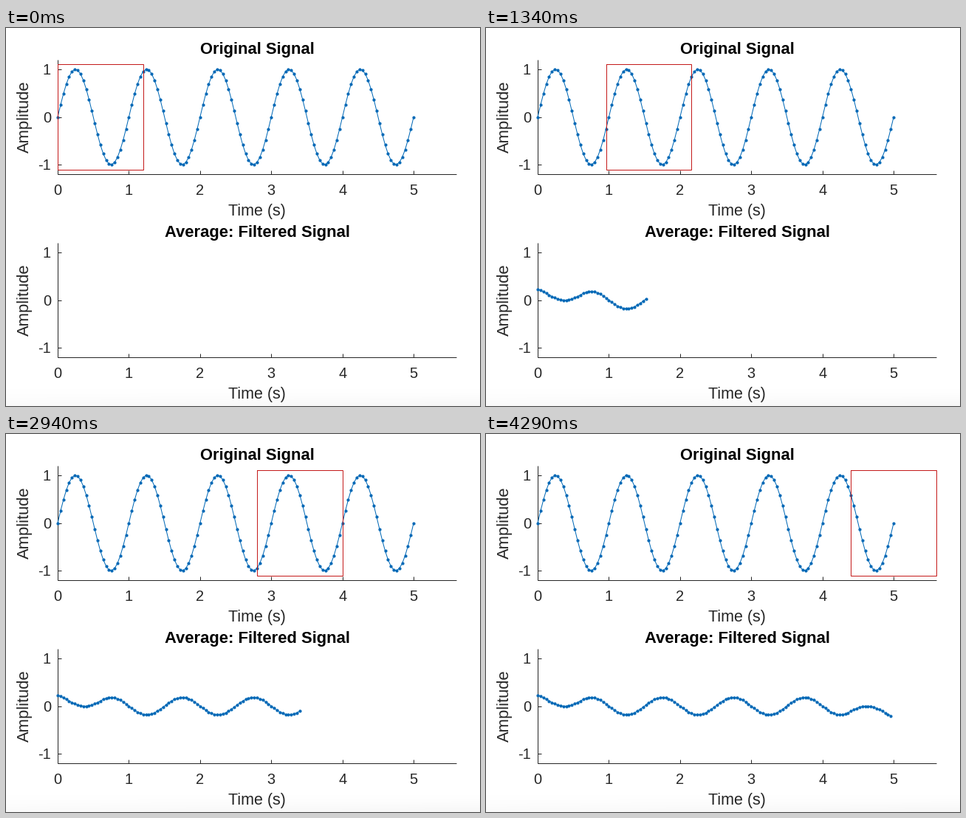
Write a matplotlib script that moves like this. It is 642 px wide and 512 px high and loops after 4.34 s.

```python
import numpy as np
import matplotlib.pyplot as plt
from matplotlib.animation import FuncAnimation
from matplotlib.collections import LineCollection

plt.rcParams["font.family"] = "Liberation Sans"

W, H, DPI = 642, 512, 64
PX = 72 / DPI                       # points per pixel
LOOP, TICK = 4340, 10               # ms
LEFT, RIGHT, HEIGHT = 70, 610, 155  # plot area in pixels
X_UNIT, Y_UNIT = 540 / 5.6, HEIGHT / 2.4
UPPER, LOWER = 43, 291              # top edge of each plot
INK, BLUE, RED = "#262626", "#0068b6", "#c41a1a"

# Sampled sine and its zero-padded moving sum
STEP, HALF = 0.04, 15
k = np.arange(126)
time = k * STEP
signal = np.sin(2 * np.pi * time)
padded = np.pad(signal, HALF)
average = np.array([padded[i:i + 2 * HALF + 1].sum() for i in k]) / (2 * HALF)

# Half steps done: the window moves first, then its average is plotted
PACE_AT = [0, 12, 27, 47, 59, 74, 86]
PACE = [-1, 38, 77, 135, 170, 213, 249]

fig = plt.figure(figsize=(W / DPI, H / DPI), dpi=DPI, facecolor="white")
ax = fig.add_axes([0, 0, 1, 1])
ax.set(xlim=(0, W), ylim=(H, 0))
ax.axis("off")


def to_x(t):
    return LEFT + X_UNIT * np.asarray(t)


def to_y(v, top):
    return top + HEIGHT / 2 - Y_UNIT * np.asarray(v)


def label(x, y, text, size, **style):
    style = {"ha": "center", "va": "baseline", "color": INK, **style}
    ax.text(x, y, text, fontsize=size * PX, **style)


def draw_plot(top, title):
    base = top + HEIGHT
    lines = [[(LEFT, top), (LEFT, base)], [(LEFT, base), (RIGHT, base)]]
    for t in range(6):
        x = to_x(t)
        lines.append([(x, base), (x, base - 5)])
        label(x, base + 28, str(t), 20)
    for v in (-1, 0, 1):
        y = to_y(v, top)
        lines.append([(LEFT, y), (LEFT + 5, y)])
        label(61, y + 7, str(v), 20, ha="right")
    ax.add_collection(LineCollection(lines, colors=INK, linewidths=PX))
    label(340, top - 8, title, 22, weight="bold", color="black")
    label(340, base + 56, "Time (s)", 21.5)
    label(32, top + HEIGHT / 2, "Amplitude", 22, rotation=90,
          ha="right", va="center", rotation_mode="default") if False else \
        label(25.5, top + HEIGHT / 2, "Amplitude", 22, rotation=90, va="center")


def dotted(x, y):
    return ax.plot(x, y, "o-", color=BLUE, lw=PX, ms=4.2 * PX, mew=0)[0]


def shade():
    """Faint grey rising towards the bottom edge."""
    x, y = np.meshgrid(np.linspace(0, 1, W), np.arange(H))
    depth = np.clip((y - 488) / 24, 0, 1) ** 1.5
    grey = 1 - 0.035 * depth * (0.6 + 0.4 * x)
    fig.figimage(np.dstack([grey] * 3), origin="upper", zorder=-1)


shade()
draw_plot(UPPER, "Original Signal")
draw_plot(LOWER, "Average: Filtered Signal")
dotted(to_x(time), to_y(signal, UPPER))
trace = dotted([], [])
window, = ax.plot([], [], color=RED, lw=PX, solid_joinstyle="miter")
box_y = to_y([1.1, 1.1, -1.1, -1.1, 1.1], UPPER)


def update(i):
    done = int(np.interp((i + 1) // 5, PACE_AT, PACE) + 1.001) - 1
    last, center = done // 2, (done + 1) // 2
    a = max(0, center - HALF) * STEP
    b = a + 2 * HALF * STEP
    window.set_data(to_x([a, b, b, a, a]), box_y)
    n = last + 1
    trace.set_data(to_x(time[:n]), to_y(average[:n], LOWER))
    return window, trace


anim = FuncAnimation(fig, update, frames=LOOP // TICK, interval=TICK,
                     repeat=True, repeat_delay=0)
plt.show()
```
